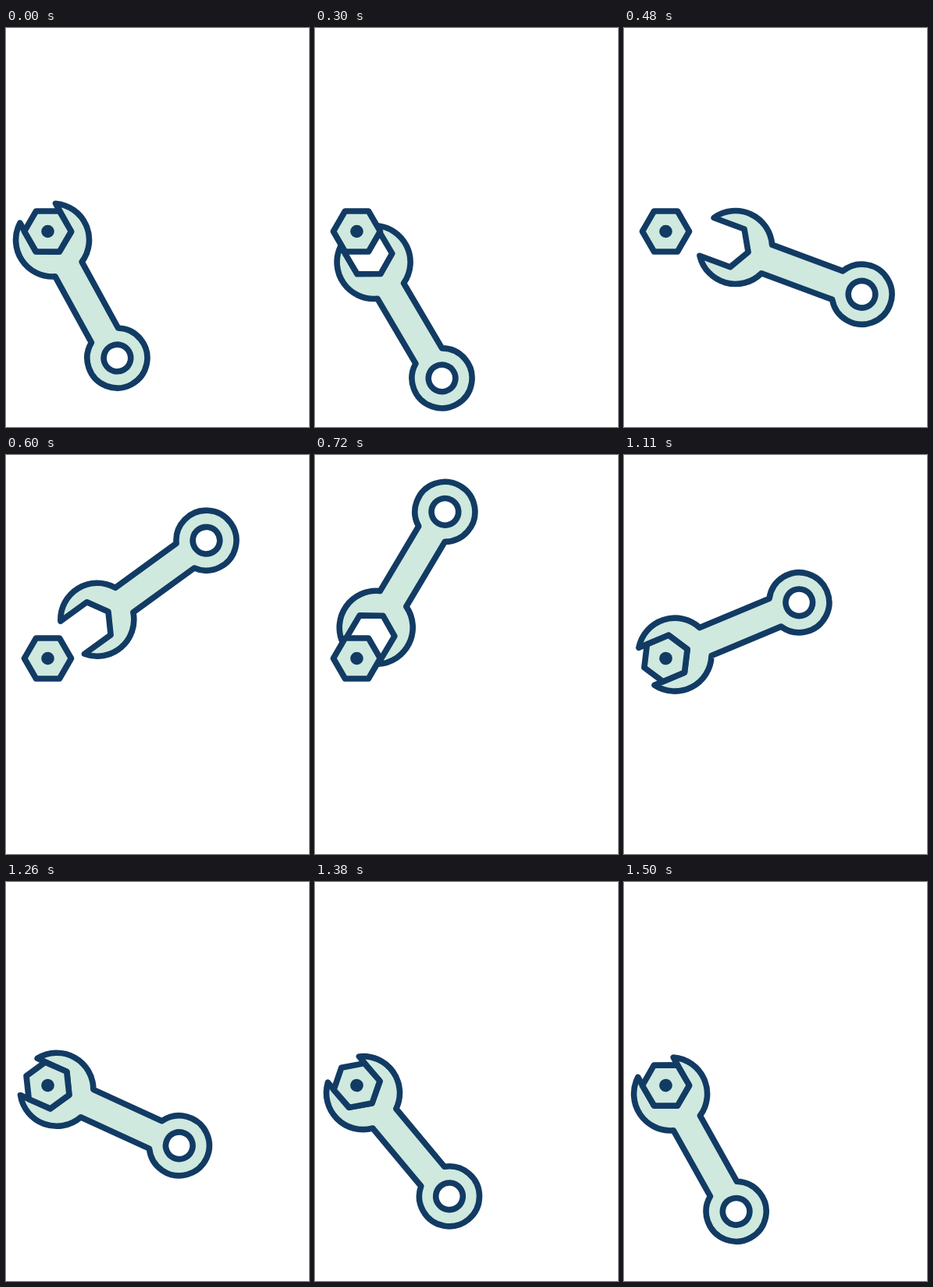
Write an HTML page that moves like this. It is 388 px wide and 512 px high and loops after 1650 ms.

```html
<!DOCTYPE html>
<html lang="en">
<head>
<meta charset="utf-8">
<title>Wrench</title>
<style>
  html, body { margin: 0; width: 100%; height: 100%; overflow: hidden; background: #fff; }
  svg { display: block; width: 100%; height: 100%; }
  g { fill: #cfe9df; stroke: #123b64; stroke-width: 7.6; stroke-linejoin: round; }
</style>
</head>
<body>
<svg viewBox="0 0 388 512">
  <g id="wrench">
    <path d="M-39.1-26A47 47 0 0 1 42.8-19.5H139.5A38.5 38.5 0 1 1 139.5 19.5H42.8A47 47 0 0 1-39.1 26H2.5L17.5 0 2.5-26Z"/>
    <circle cx="172.7" r="17.3" fill="#fff"/>
  </g>
  <g id="nut">
    <path d="M30 0L15 26H-15L-30 0-15-26H15Z"/>
    <circle r="8.3" fill="#123b64" stroke="none"/>
  </g>
</svg>
<script>
const LOOP = 1650, STEP = 30, LAST_MOVE = 1500;
const NUT = { x: 53.5, y: 261 };
const START_ANGLE = 61.3, SWEEP = 121.3;
const GRIP = 12.5, REACH = 79.5;
const wrench = document.getElementById('wrench');
const nut = document.getElementById('nut');

// Progress from 0 to 1 along cubic-bezier(x1, 0, x2, 1), found by bisection
function ease(t, from, to, x1, x2) {
  const u = Math.min(1, Math.max(0, (t - from) / (to - from)));
  let lo = 0, hi = 1, s;
  for (let i = 0; i < 24; i++) {
    s = (lo + hi) / 2;
    const x = 3 * s * (1 - s) * ((1 - s) * x1 + s * x2) + s ** 3;
    if (x < u) lo = s; else hi = s;
  }
  return s * s * (3 - 2 * s);
}

const place = (el, x, y, angle) =>
  el.setAttribute('transform', `translate(${x} ${y}) rotate(${angle})`);

function draw(now) {
  const t = Math.min(LAST_MOVE, Math.floor(now % LOOP / STEP) * STEP);
  // Pull off the nut, swing round it, slide back on, then turn it
  const pull = ease(t, 150, 510, 0.52, 0.36);
  const push = ease(t, 510, 930, 0.3, 0.58);
  const orbit = ease(t, 300, 780, 0.4, 0.4);
  const swing = ease(t, 240, 750, 0.6, 0.54);
  const turn = ease(t, 930, 1530, 0.27, 0.51);

  const dist = GRIP + REACH * (pull - push);
  const dir = (START_ANGLE + SWEEP * (turn - orbit)) * Math.PI / 180;
  const tilt = START_ANGLE + SWEEP * (turn - swing);
  place(wrench, NUT.x + dist * Math.cos(dir), NUT.y + dist * Math.sin(dir), tilt);
  place(nut, NUT.x, NUT.y, 120 * turn);
}

const start = performance.now();
(function frame() {
  draw(performance.now() - start);
  requestAnimationFrame(frame);
})();
</script>
</body>
</html>
```
